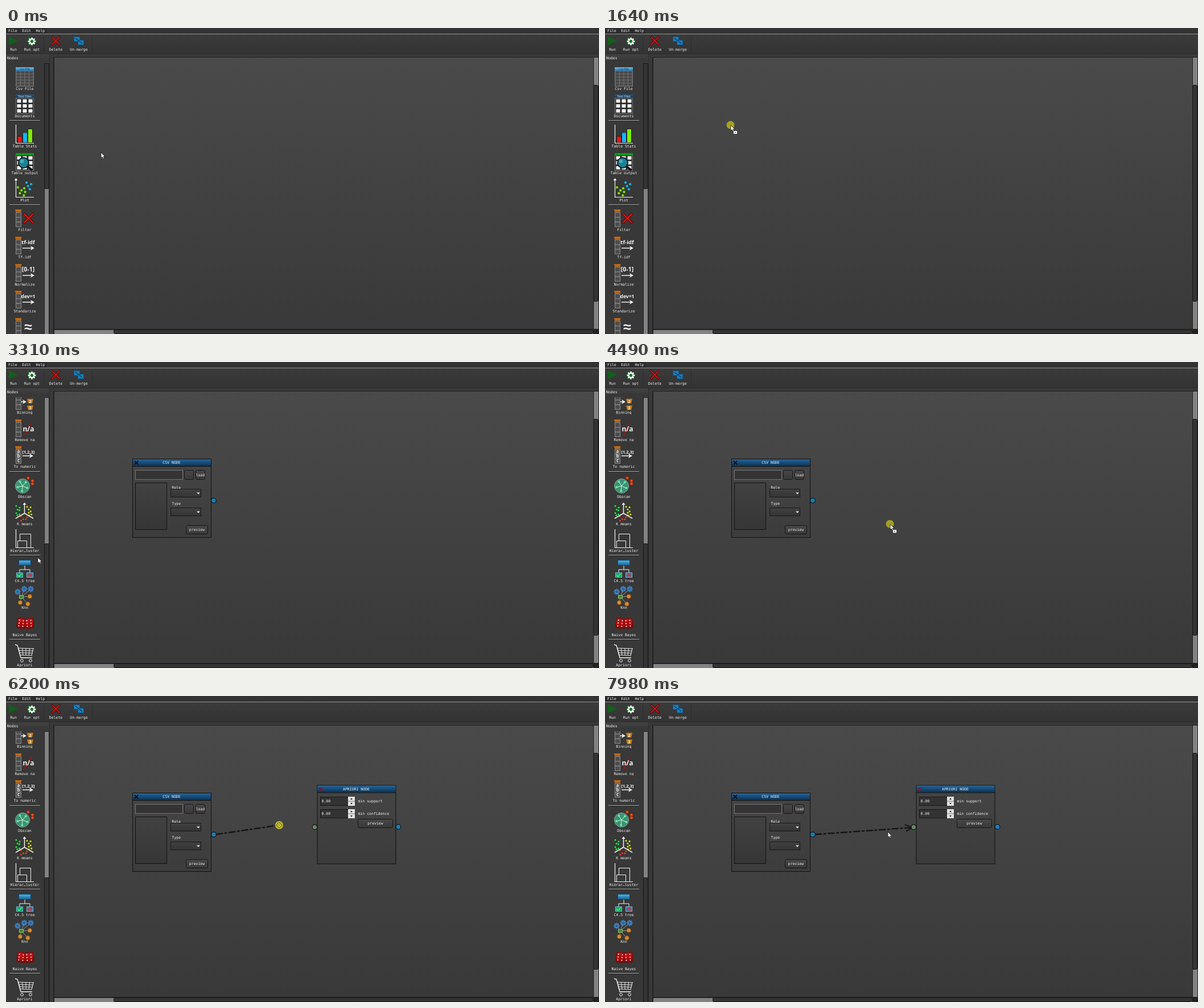
These frames come from a looping animation (1042x538 px, 8000 ms). An HTML page with a canvas:

```html
<!DOCTYPE html>
<html>
<head>
<meta charset="utf-8">
<style>
html, body { margin: 0; width: 100%; height: 100%; overflow: hidden; background: #393939; }
canvas { display: block; }
</style>
</head>
<body>
<canvas id="stage" width="1042" height="538"></canvas>
<script>
const ctx = document.getElementById('stage').getContext('2d');
const LOOP = 8000, TAU = Math.PI * 2;
const MONO = '"DejaVu Sans Mono", monospace', SANS = '"Noto Sans", sans-serif';
const WHITE = '#f2f2f2', EDGE = '#151515', BLUE = '#187fba';

// ---------- helpers ----------
function times(n, fn) { for (let i = 0; i < n; i++) fn(i); }
function fade(y, h, top, bottom) {
  const g = ctx.createLinearGradient(0, y, 0, y + h);
  g.addColorStop(0, top); g.addColorStop(1, bottom);
  return g;
}
function rect(x, y, w, h, fill, edge) {
  ctx.fillStyle = fill; ctx.fillRect(x, y, w, h);
  if (edge) { ctx.strokeStyle = edge; ctx.lineWidth = 1; ctx.strokeRect(x + .5, y + .5, w - 1, h - 1); }
}
function round(x, y, w, h, fill, edge = EDGE, r = 2) {
  ctx.beginPath(); ctx.roundRect(x + .5, y + .5, w - 1, h - 1, r);
  ctx.fillStyle = fill; ctx.fill();
  ctx.strokeStyle = edge; ctx.lineWidth = 1; ctx.stroke();
}
function trace(pts) {
  ctx.beginPath();
  for (let i = 0; i < pts.length; i += 2) ctx.lineTo(pts[i], pts[i + 1]);
}
function line(pts, color = WHITE, w = 1) { trace(pts); ctx.strokeStyle = color; ctx.lineWidth = w; ctx.stroke(); }
function poly(pts, fill) { trace(pts); ctx.fillStyle = fill; ctx.fill(); }
function dot(x, y, r, fill, edge, w = 1) {
  ctx.beginPath(); ctx.arc(x, y, r, 0, TAU);
  if (fill) { ctx.fillStyle = fill; ctx.fill(); }
  if (edge) { ctx.strokeStyle = edge; ctx.lineWidth = w; ctx.stroke(); }
}
function text(s, x, y, align = 'left', color = WHITE, font = '6.5px ' + MONO) {
  ctx.font = font; ctx.textAlign = align; ctx.fillStyle = color;
  ctx.fillText(s, x, y);
}
const bold = (s, x, y, size, color = WHITE) => text(s, x, y, 'center', color, `bold ${size}px ${SANS}`);
function cross(x, y, r, color, w) {
  for (const s of [r, -r]) line([x - r, y - s, x + r, y + s], color, w);
}
const triangle = (x, y, r, dir) => poly([x - r, y, x + r, y, x, y + r * dir], WHITE);
const polar = (x, y, r, a) => [x + r * Math.cos(a), y + r * Math.sin(a)];
function gear(x, y, r, color) {
  times(8, i => line([x, y, ...polar(x, y, r, i * TAU / 8)], color, r * .42));
  dot(x, y, r * .72, color);
}
// jittered dots spread over a box, always the same for one seed
function scatter(seed, n, x, y, w, h, r, fill) {
  const rnd = () => (seed = seed * 16807 % 2147483647) / 2147483647;
  times(n, i => dot(x + w * (i % 2 * .55 + rnd() * .45), y + h * (i + rnd()) / n, r, fill, '#1c3414', .7));
}

// ---------- node icons, y relative to the label ----------
function column() {
  times(3, i => rect(17, -31 + i * 8.4, 10, 9, '#4e4e4e', '#8c8c8c'));
  poly([16, -36, 27.5, -36, 26.5, -31.5, 17, -31.5], '#c4680e');
}
function arrow(x0, x1, y) {
  line([x0, y, x1 - 3, y], WHITE, 1.5);
  poly([x1 - 7, y - 4, x1, y, x1 - 7, y + 4, x1 - 5, y], WHITE);
}
function cells(n, w, h, fill) {
  rect(17, -32, 32, 28, '#292929', '#777');
  times(n * n, i => rect(18 + (i % n + .5) * 30 / n - w / 2, -31 + ((i / n | 0) + .5) * 26 / n - h / 2, w, h, fill));
}
const axes = y => line([17.5, -38, 17.5, y, 49, y], WHITE, 1.2);
const tagged = (s, size) => () => { column(); bold(s, 39, -23, size); arrow(29, 50, -16); };
const header = (s, a, b, ink) => {
  rect(17, -38, 32, 6, fade(-38, 6, a, b));
  text(s, 33, -33, 'center', ink, '5.5px ' + SANS);
};

const icons = {
  csv() {
    rect(17, -34, 32, 30, '#707070');
    times(20, i => rect(18.5 + i % 4 * 7.5, -31 + (i / 4 | 0) * 5.3, 6.4, 4.3, '#484848'));
    header('csv file', '#6cc0ee', '#2277b4', '#143a58');
  },
  docs() { cells(3, 7, 6, WHITE); header('Text Files', '#1f5b8c', '#123a5c', '#cde4f4'); },
  stats() {
    axes(-5.5);
    ['#f31313', '#12b4ff', '#7cf000'].forEach((c, i) => {
      const h = 12 + i * 6.5;
      rect(20 + i * 9, -6 - h, 9, h, c, '#222');
    });
  },
  output() {
    cells(3, 7, 6, WHITE);
    rect(17, -35, 32, 4, '#0c9b18');
    line([37, -12, 46, -5], EDGE, 4);
    dot(31, -18, 9, '#168394', '#101c20', 2);
    dot(28, -21, 3.5, '#49a9b5');
  },
  plot() {
    axes(-5.5);
    triangle(17.5, -35, 3, -1.3);
    scatter(11, 6, 21, -24, 16, 16, 2.5, '#86e010');
    scatter(5, 4, 36, -34, 9, 17, 2.5, '#20b4f4');
  },
  filter() { column(); cross(39.5, -20.5, 8.5, '#5a0000', 4); cross(39.5, -20.5, 8, '#e01414', 2.4); },
  tfidf: tagged('tf-idf', 9.5),
  norm: tagged('[0-1]', 10.5),
  dev: tagged('dev=1', 8.6),
  approx() { column(); bold('≈', 39, -12, 25); },
  part() {
    column();
    line([36, -27, 32.5, -26, 32.5, -12, 36, -11], WHITE, 1.5);
    line([28, -19, 32, -19], WHITE, 1.5);
    bold('train', 43, -25, 6.8); bold('test', 43, -9, 6.8);
  },
  bin() {
    column(); arrow(27, 36, -19);
    times(3, i => {
      const y = -32 + i * 11.7;
      poly([37, y - 4, 48, y - 4, 46, y + 4, 39, y + 4], '#c97d18');
      bold(i + 1, 42.5, y + 3, 7.5);
    });
  },
  na() { column(); line([33, -8, 44, -30], '#a01515', 2); bold('n/a', 39.5, -15, 12); },
  numeric() {
    column();
    times(3, i => bold('abc'[i], 22, -24.5 + i * 8.4, 8));
    bold('[1,2,3]', 39.5, -23, 7.5); arrow(29, 48, -19);
  },
  dbscan() {
    dot(29, -19, 12.5, '#3f9078', '#86a89c');
    times(5, i => {
      const [x, y] = polar(29, -19, 9, i * TAU / 5 + .4);
      line([29, -19, x, y], '#c4ffda'); dot(x, y, 2, '#67ef8e');
    });
    times(3, i => dot(39 + Math.min(i, 1) * 7.5, -33 + i * 5, 2.8, '#e2501f', '#7a2108'));
  },
  kmeans() {
    scatter(3, 7, 18, -33, 9, 20, 2, '#33d95c');
    scatter(7, 7, 37, -33, 9, 20, 2, '#e2d52b');
    scatter(9, 5, 26, -14, 12, 9, 2, '#e84040');
    times(3, i => line([32.5, -19, ...polar(32.5, -19, 18, -TAU / 4 + i * TAU / 3)], WHITE, 1.5));
    triangle(32.5, -34, 3, -1.3);
  },
  hier() {
    axes(-5.5);
    line([20.5, -6, 20.5, -17.5, 36.5, -17.5, 36.5, -6]);
    line([24.5, -18, 24.5, -29.5, 43.5, -29.5, 43.5, -6]);
  },
  tree() {
    line([33, -27, 33, -20]); line([24, -14, 24, -20, 42, -20, 42, -14]);
    rect(22, -37, 22, 10, fade(-37, 10, '#55b9e6', '#155f91'), '#0f4568');
    rect(18, -15, 12, 9, '#1c9d78', '#6bbbd0'); line([20, -11, 23, -8, 28, -13], '#35ff50', 1.6);
    rect(36, -15, 12, 9, '#44709c', '#7bb6d8'); cross(42, -10.5, 3, '#e03434', 1.6);
  },
  knn() {
    times(3, i => {
      const x = 20.5 + i * 11.5, y = -28 - Math.min(i, 1) * 5, [a, b] = polar(33, -15, 10, 2.5 - i * 1.5);
      line([27, -19, x, y], '#999'); line([27, -19, a, b], '#999');
      gear(x, y, 5.3, '#3f7fbd'); dot(x, y, 2, '#2c5f94');
      dot(a, b, 3.8, '#d98b32', '#7a4a10');
    });
    rect(23, -22, 8, 6, '#3c8a24', '#8fc97a');
  },
  dice() {
    for (const side of [0, 1]) {
      ctx.save();
      ctx.translate(27 + side * 14, -20.5); ctx.rotate(side ? -.08 : .12);
      round(-8, -9, 16, 18, fade(-9, 18, '#d01616', '#8c0808'), '#700', 3);
      times(6, i => dot(-4 + i % 2 * 7, -5 + (i >> 1) * 5, 1, WHITE));
      ctx.restore();
    }
  },
  cart() {
    line([16, -36, 20, -35, 26, -13, 46, -13], WHITE, 1.3);
    times(4, i => line([21 + i, -30 + i * 4, 49 - i, -29 + i * 4], WHITE, .9));
    times(5, i => line([22 + i * 6.5, -30, 25 + i * 5, -17], WHITE, .9));
    for (const x of [28, 43]) dot(x, -8, 2.4, null, WHITE);
  }
};

// '-' marks a separator
const items = [];
let rowY = 107.3;
for (const row of ['csv:Csv File', 'docs:Documents', '-', 'stats:Table Stats', 'output:Table output', 'plot:Plot', '-',
  'filter:Filter', 'tfidf:Tf-idf', 'norm:Normalize', 'dev:Standarize', 'approx:Approximate na', 'part:Partition',
  'bin:Binning', 'na:Remove na', 'numeric:To numeric', '-', 'dbscan:Dbscan', 'kmeans:K means', 'hier:Hierar…luster', '-',
  'tree:C4.5 tree', 'knn:Knn', 'dice:Naive Bayes', '-', 'cart:Apriori']) {
  if (row === '-') { items.push({ sep: true, y: rowY - 40.4 }); rowY += 5; continue; }
  const [icon, label] = row.split(':');
  items.push({ icon, label, y: rowY });
  rowY += 47.6;
}

// ---------- timeline ----------
const CSV_DROP = 1660, NODE_DROP = 4900, WIRE_START = 5900, WIRE_END = 7000;
const SCROLL_END = 2900, WAKE = 3310, NOTCH = 50.16;
const start = [167, 219];
// pointer strokes: begin, end, target and an optional halfway point
const strokes = [
  { from: 200, to: 940, at: [38, 92], via: [170, 125] },
  { from: 1020, to: 1620, at: [221, 171] },
  { from: 1665, to: 1980, at: [42, 332], via: [110, 231] },
  { from: WAKE - 1, to: WAKE, at: [56, 344] },
  { from: WAKE, to: 4050, at: [34, 516], via: [195, 440] },
  { from: 4150, to: 4830, at: [547, 157], via: [500, 286] },
  { from: 5040, to: 5740, at: [365, 245] },
  { from: WIRE_START, to: 6600, at: [547, 232], via: [501, 225] },
  { from: WIRE_END, to: 7490, at: [497, 252] },
  { from: 7750, to: 7980, at: [497, 239] }
];
const wheel = [{ at: 2180, notches: 6, gap: 26 }, { at: 2560, notches: 3, gap: 45 }, { at: 2850, notches: 2, gap: 50 }];
const clamp = (v, lo, hi) => Math.min(hi, Math.max(lo, v));

function pointer(t) {
  let pos = start;
  for (const { from, to, at, via } of strokes) {
    if (t < from) break;
    const u = clamp((t - from) / (to - from), 0, 1), s = u * u * (3 - 2 * u);
    pos = pos.map((p, k) => {
      const mid = (p + at[k]) / 2;
      return p + (at[k] - p) * s + (via ? (via[k] - mid) * 4 * s * (1 - s) : 0);
    });
  }
  return pos;
}
const notchesAt = t => wheel.reduce((n, w) => n + clamp(Math.floor((t - w.at) / w.gap) + 1, 0, w.notches), 0);

// ---------- parts ----------
function toolbar() {
  rect(0, 0, 1042, 538, '#393939');
  rect(0, 0, 1042, 10, '#343434');
  rect(0, 0, 72, 10, '#2c2c2c');
  ['File', 'Edit', 'Help'].forEach((s, i) => text(s, 4 + i * 24.3, 7.3));
  rect(0, 10, 1042, 1, '#949494');
  rect(0, 11, 1042, 35, fade(11, 35, '#3b3b3b', '#333'));
  rect(0, 45, 1042, 1, '#2b2b2b');
  for (const x of [66, 151]) rect(x, 14, 1, 28, '#2d2d2d');
  for (const x of [5, 38]) poly([x, 15, x + 16, 22.5, x, 30], '#11601a');
  gear(45.5, 23.5, 6.8, '#f4f4f4'); dot(45.5, 23.5, 2.7, '#167a1c');
  cross(87.5, 22.5, 7.5, '#500000', 3.6); cross(87.5, 22.5, 7, '#d31515', 2);
  times(2, i => rect(119 + i * 7, 15 + i * 6, 11, 9, BLUE, '#0f5688'));
  line([122, 18, 134, 27], '#103b5a', 1.2);
  Object.entries({ Run: 13, 'Run opt': 45.5, Delete: 87.5, 'Un-merge': 128 })
    .forEach(([s, x]) => text(s, x, 40.4, 'center'));
  rect(0, 46, 77, 13, fade(46, 13, '#424242', '#363636'));
  text('Nodes', 2, 54.6);
}

function workspace() {
  rect(83, 51, 959, 487, '#222');
  rect(85, 52, 947, 477, fade(52, 477, '#4a4a4a', '#393939'));
  rect(1033, 52, 8, 477, '#828282');
  round(1032, 100, 9, 381, '#343434');
  rect(85, 531, 947, 7, '#828282');
  round(189, 530, 843, 8, '#343434');
}

function sidebar(scroll, hover) {
  ctx.save();
  ctx.beginPath(); ctx.rect(0, 62, 77, 476); ctx.clip();
  rect(0, 62, 67, 476, '#383838');
  for (const it of items) {
    const y = Math.round(it.y - scroll);
    if (y < 30 || y > 590) continue;
    if (it.sep) { rect(6, y, 54, 1, '#a8a8a8'); rect(6, y + 1, 54, 1, '#222'); continue; }
    ctx.save();
    ctx.translate(0, y);
    if (it === hover) round(5, -40, 57, 44, fade(-40, 44, '#646464', '#454545'), '#858585');
    icons[it.icon]();
    ctx.beginPath(); ctx.rect(0, -5, 67, 8); ctx.clip();
    text(it.label, 33, 2.4, 'center', it === hover ? '#c88322' : WHITE);
    ctx.restore();
  }
  rect(67, 62, 9, 480, '#828282', '#222');
  round(67, Math.round(62 + scroll * .465), 9, 221, '#343434');
  ctx.restore();
  rect(76, 46, 1, 492, '#2b2b2b');
}

const port = (x, y, color) => dot(x, y, 4.3, color, EDGE, 1.2);
function button(x, y, w, h, s = '') {
  round(x, y, w, h, fade(y, h, '#484848', '#383838'));
  text(s, x + w / 2, y + h / 2 + 2.4, 'center');
}
// draws a node frame; its content uses coordinates relative to the frame
function node(x, y, title, mark, content) {
  ctx.save();
  ctx.translate(x, y);
  rect(0, 0, 139, 139, fade(0, 139, '#454545', '#3c3c3c'), '#111');
  rect(1, 1, 137, 12, fade(0, 13, '#2568a0', '#0d3354'));
  rect(0, 13, 139, 1, '#111');
  text(title, 69, 9.3, 'center');
  cross(7, 7, 3.2, mark, 1.7);
  content();
  port(143, 73.5, BLUE);
  ctx.restore();
}

const csvNode = () => node(222, 170, 'CSV NODE', '#170808', () => {
  rect(5, 20, 84, 17, '#343434', '#747474');
  button(91, 20, 17, 17);
  button(111, 20, 17, 17, 'load');
  rect(5, 42, 56, 83, fade(42, 83, '#424242', '#363636'), '#111');
  ['Role', 'Type'].forEach((s, i) => {
    const y = 53 + i * 33;
    text(s, 69.5, y - i * 5.3);
    rect(67, y, 54, 15, fade(y, 15, '#414141', '#343434'), '#191919');
    triangle(116, y + 6.5, 3, 1);
  });
  button(94, 117, 39, 16, 'preview');
});

const aprioriNode = () => node(546.5, 156.5, 'APRIORI NODE', '#8d1320', () => {
  ['min support', 'min confidence'].forEach((s, i) => {
    const y = 20.5 + i * 22;
    rect(5.5, y, 61, 16, '#333', '#171717');
    text('0.00', 8, y + 10.4);
    rect(54.5, y, 12, 16, '#e2e2e2');
    rect(54.5, y + 7.5, 12, 1, '#777');
    for (const d of [-1, 1]) poly([58.5, y + 8 + d * 3, 62.5, y + 8 + d * 3, 60.5, y + 8 + d * 5.5], EDGE);
    text(s, 72, y + 10.4);
  });
  button(71.5, 59.5, 62, 16, 'preview');
  port(-4, 74, '#65886b');
});

function wire(x, y) {
  ctx.lineCap = 'square';
  ctx.setLineDash([10, 5, 2.5, 5]);
  line([370, 243.3, x, y], '#161616', 2.5);
  ctx.setLineDash([]);
  ctx.lineCap = 'butt';
}

function cursor(x, y, pressed, mode) {
  if (mode === 'deny') {
    dot(x, y, 7, '#cdc72a');
    dot(x, y, 4.8, null, '#6b681a');
    for (const d of [-2, 0, 2]) line([x - 3 + d, y - 3 - d, x + 3 + d, y + 3 - d], '#6b681a', .9);
    return;
  }
  if (pressed) dot(x - .5, y - .5, 7, 'rgba(190,182,25,.8)');
  ctx.save();
  ctx.translate(x, y);
  const outline = [0, 0, 0, 9.5, 2.2, 7.6, 3.8, 11, 5.5, 10.2, 4, 7, 7, 6.8, 0, 0];
  poly(outline, '#fff'); line(outline, '#1c1c1c', .8);
  if (mode === 'copy') { rect(5, 10, 6, 5, '#fff'); rect(7, 12, 2, 1, '#111'); }
  ctx.restore();
}

function draw(t) {
  const [x, y] = pointer(t);
  const n = notchesAt(t), scroll = n * NOTCH;
  // the highlight trails the wheel by one notch
  const seen = t < SCROLL_END ? Math.max(0, n - 1) * NOTCH : scroll;
  const idle = t >= SCROLL_END && t < WAKE;
  const hover = !idle && items.find(it => !it.sep && x > 4 && x < 62 && Math.abs(y - it.y + seen + 18) < 22);

  const dragging = (t >= 1020 && t < CSV_DROP) || (t >= 4150 && t < NODE_DROP);
  const wiring = t >= WIRE_START && t < WIRE_END && x > 372;
  let mode = 'arrow';
  if (dragging && x > 42) mode = x < 84 ? 'deny' : 'copy';
  if (wiring) mode = x < 538 ? 'deny' : 'copy';

  toolbar();
  workspace();
  sidebar(scroll, hover);
  if (wiring) wire(x, y);
  if (t >= WIRE_END) {
    wire(538, 231.4);
    line([527, 226.5, 541, 231.2, 529, 237.5], '#161616', 2.3);
  }
  if (t >= CSV_DROP) csvNode();
  if (t >= NODE_DROP) aprioriNode();
  cursor(x, y, dragging || (t >= WIRE_START && t < WIRE_END), mode);
}

function tick(now) {
  draw(now % LOOP);
  requestAnimationFrame(tick);
}
draw(0);
requestAnimationFrame(tick);
</script>
</body>
</html>
```
